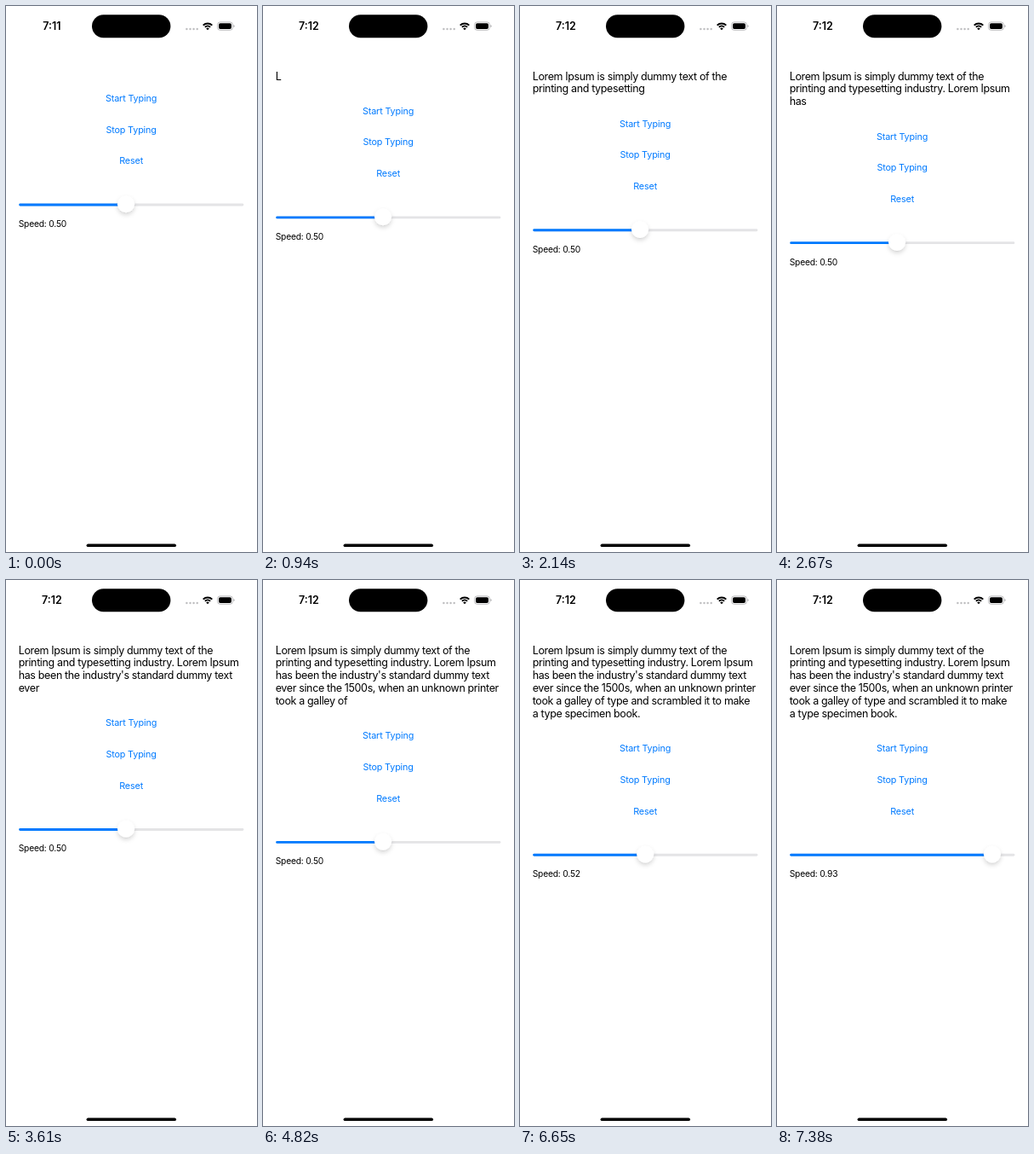
Recreate the animation shown at these times as an HTML page. Size 295x640 px, loop 8 s.

```html
<!DOCTYPE html>
<html lang="en">
<head>
<meta charset="utf-8">
<title>Typing label</title>
<style>
  html, body { margin: 0; width: 100%; height: 100%; overflow: hidden; background: #fff; }
  svg { display: block; width: 100%; height: 100%; font-family: Inter, Roboto, sans-serif; }
  .clock { font-size: 12.46px; font-weight: 600; text-anchor: middle; }
  .body { font-size: 12.46px; letter-spacing: -0.34px; }
  .button { font-size: 10.8px; letter-spacing: -0.15px; fill: #007aff; text-anchor: middle; }
  .speed { font-size: 10.26px; letter-spacing: -0.19px; }
</style>
</head>
<body>
<svg viewBox="0 0 295 640">
  <defs>
    <filter id="shadow" x="-60%" y="-60%" width="220%" height="240%">
      <feDropShadow dx="0" dy="0.4" stdDeviation="0.7" flood-opacity="0.12"/>
      <feDropShadow dx="0" dy="2.8" stdDeviation="2.4" flood-opacity="0.15"/>
    </filter>
  </defs>

  <text id="clock" class="clock" x="54" y="28.3"></text>
  <rect x="101" y="10.3" width="92.4" height="27" rx="13.5"/>
  <g fill="#bdbdbf">
    <circle cx="212.4" cy="27" r="1.2"/>
    <circle cx="216.5" cy="27" r="1.2"/>
    <circle cx="220.6" cy="27" r="1.2"/>
    <circle cx="224.7" cy="27" r="1.2"/>
  </g>
  <g fill="none" stroke="#000" stroke-width="2">
    <path d="M231.7 22.6A7.5 7.5 0 0 1 242.3 22.6"/>
    <path d="M233.9 24.8A4.4 4.4 0 0 1 240.1 24.8"/>
  </g>
  <path d="M237 28.2L235.2 26.4A2.5 2.5 0 0 1 238.8 26.4Z"/>
  <rect x="248.6" y="18.9" width="17.8" height="9.4" rx="3" fill="none" stroke="#a9a9ab" stroke-width="0.8"/>
  <rect x="250" y="20.3" width="15" height="6.6" rx="1.9"/>
  <path d="M267.5 22.1Q268.7 22.6 268.7 23.6T267.5 25.1Z" fill="#a9a9ab"/>

  <g id="lines" class="body"></g>

  <g id="controls">
    <text class="button" x="147.1" y="111.9">Start Typing</text>
    <text class="button" x="147.1" y="148.6">Stop Typing</text>
    <text class="button" x="147.1" y="185.3">Reset</text>
    <rect x="15.2" y="231.6" width="264.2" height="2.9" rx="1.45" fill="#e4e4e6"/>
    <rect id="fill" x="15.2" y="231.6" height="2.9" rx="1.45" fill="#007aff"/>
    <circle id="thumb" cy="232.2" r="10.1" fill="#fff" filter="url(#shadow)"/>
    <text id="speed" class="speed" x="14.7" y="259"></text>
  </g>

  <rect x="94.6" y="630.4" width="105.4" height="3.7" rx="1.85"/>
</svg>
<script>
const LOOP = 8000, LINE_HEIGHT = 14.87;
const TYPE_START = 730, TYPE_TICK = 106.6;
const DRAG_START = 6650, DRAG_TICK = 121.6, DRAG_STEPS = 7;
const SPEED_FROM = 0.5, SPEED_TO = 0.934;

// Each line, with how many letters of its first word still fit on the line above.
const LINES = [
  ["Lorem Ipsum is simply dummy text of the", 0],
  ["printing and typesetting industry. Lorem Ipsum", 6],
  ["has been the industry's standard dummy text", 0],
  ["ever since the 1500s, when an unknown printer", 1],
  ["took a galley of type and scrambled it to make", 0],
  ["a type specimen book.", 0]
];

// Typing progress: [tick, letters shown]
const PACE = [[0, 0], [1, 1], [9, 43], [18, 90], [27, 135], [38, 193], [44, 225], [48, 245]];

const $ = id => document.getElementById(id);
const clamp = (x, lo, hi) => Math.min(hi, Math.max(lo, x));
const smooth = x => x * x * (3 - 2 * x);

const rows = LINES.map((_, i) => {
  const row = document.createElementNS("http://www.w3.org/2000/svg", "text");
  row.setAttribute("x", 14.7);
  row.setAttribute("y", 86.6 + i * LINE_HEIGHT);
  return $("lines").appendChild(row);
});

function lettersAt(tick) {
  const last = PACE[PACE.length - 1];
  if (tick <= 0) return 0;
  if (tick >= last[0]) return last[1];
  const i = PACE.findIndex(p => p[0] > tick);
  const [k0, n0] = PACE[i - 1], [k1, n1] = PACE[i];
  return Math.round(n0 + (n1 - n0) * (tick - k0) / (k1 - k0));
}

function wrap(count) {
  const out = [];
  for (const [line, spill] of LINES) {
    if (count <= 0) break;
    const part = line.slice(0, count);
    if (out.length && count <= spill) out[out.length - 1] += " " + part;
    else out.push(part);
    count -= line.length + 1;
  }
  return out;
}

function render(t) {
  const tick = Math.floor((t - TYPE_START) / TYPE_TICK);
  const text = wrap(lettersAt(tick));
  rows.forEach((row, i) => row.textContent = text[i] || "");
  $("clock").textContent = tick < 0 ? "7:11" : "7:12";
  $("controls").setAttribute("transform", `translate(0 ${text.length * LINE_HEIGHT})`);

  const step = Math.floor((t - DRAG_START) / DRAG_TICK) + 1;
  const drag = smooth(clamp(step / DRAG_STEPS, 0, 1));
  const speed = SPEED_FROM + (SPEED_TO - SPEED_FROM) * drag;
  const x = 25 + 245 * (speed - 0.05) / 0.95;
  $("thumb").setAttribute("cx", x);
  $("fill").setAttribute("width", x - 15.2);
  $("speed").textContent = "Speed: " + speed.toFixed(2);
}

function loop() {
  render(performance.now() % LOOP);
  requestAnimationFrame(loop);
}
loop();
</script>
</body>
</html>
```
